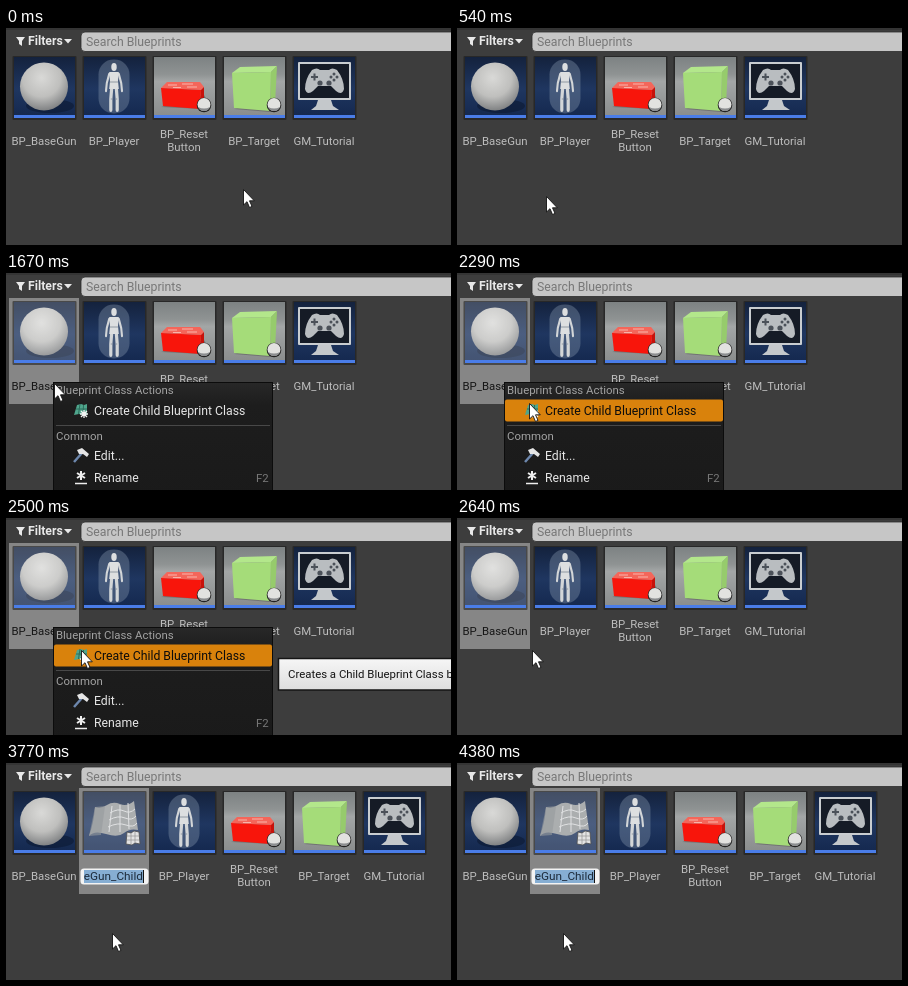
Write an HTML page that moves like this. It is 445 by 217 pixels and loops after 4.85 s.

```html
<!DOCTYPE html>
<html lang="en">
<head>
<meta charset="utf-8">
<title>Create child blueprint</title>
<style>
html, body { margin: 0; width: 100%; height: 100%; overflow: hidden; background: #3d3d3d; }
svg { display: block; width: 445px; height: 217px; font: 11.4px Roboto, Arial, sans-serif; }
text { white-space: pre; }
.m { font-size: 12.25px; }
.label { fill: #bdbdbd; text-anchor: middle; }
.picked .label { fill: #161616; }
.dim { fill: #a3a3a3; }
.lit { fill: #e6e6e6; }
</style>
</head>
<body>
<svg viewBox="0 0 445 217">
  <defs>
    <linearGradient id="navy" x2="0" y2="1">
      <stop stop-color="#14223d"/><stop offset=".55" stop-color="#1f3660"/><stop offset="1" stop-color="#152950"/>
    </linearGradient>
    <linearGradient id="scene" x2="0" y2="1">
      <stop stop-color="#7d8283"/><stop offset=".3" stop-color="#8f9393"/><stop offset=".42" stop-color="#a3a6a6"/><stop offset="1" stop-color="#8b8e8e"/>
    </linearGradient>
    <radialGradient id="ball" cx=".45" cy=".32" r=".72">
      <stop stop-color="#d9d9d7"/><stop offset=".55" stop-color="#bfbfbd"/><stop offset="1" stop-color="#787a7c"/>
    </radialGradient>
    <linearGradient id="tip" x2="0" y2="1">
      <stop stop-color="#f6f6f6"/><stop offset="1" stop-color="#dedede"/>
    </linearGradient>
    <linearGradient id="menuFill" x2="0" y2="1">
      <stop stop-color="#282828"/><stop offset=".2" stop-color="#1d1d1d"/><stop offset="1" stop-color="#1a1a1a"/>
    </linearGradient>

    <g id="gun">
      <rect width="61" height="58" fill="url(#navy)"/>
      <ellipse cx="36" cy="49" rx="24" ry="7" fill="#0d1a33" opacity=".6"/>
      <circle cx="30" cy="29.500" r="24" fill="url(#ball)"/>
    </g>
    <g id="child">
      <rect width="61" height="58" fill="url(#navy)"/>
      <path d="M11 15Q17 17 23 13T36 12T50 9L54 38Q46 36 40 41T22 42T5 44Q10 30 11 15Z" fill="#96999b"/>
      <path d="M26 21Q34 16 40 19T51 17M25 28Q34 23 41 26T52 24M24 35Q34 30 42 33T53 31M28 14L25 40M36 13L36 40M44 11L45 37" fill="none" stroke="#d8dadb"/>
      <path d="M11 15L5 44L17 43L21 14Z" fill="#7c8083" opacity=".6"/>
      <path d="M43 40L47 41L50 39L55 40L56 52L51 51L48 53L42 52Z" fill="#dcdcdc" stroke="#222" stroke-width=".8"/>
      <path d="M43 44H55M43 48H55M47 41V52M51 40V51" stroke="#777" stroke-width=".7"/>
    </g>
    <g id="player">
      <rect width="61" height="58" fill="url(#navy)"/>
      <rect x="14.500" y="2.500" width="31" height="54" rx="15" fill="#8192a8" opacity=".4"/>
      <g transform="translate(5.200) scale(.8 1)">
        <g fill="none" stroke="#d3d6d8" stroke-linecap="round">
          <path d="M25 17L22 26L21 34M37 17L40 26L41 34" stroke-width="2.600"/>
          <path d="M28 32L27 42L27 53M34 32L35 42L35 53" stroke-width="4"/>
        </g>
        <path d="M25 15H37L36 24L37 32H25L26 24Z" fill="#dddfe0"/>
        <path d="M26 25H36M27 42H29M33 42H35" stroke="#87909b"/>
        <ellipse cx="31" cy="10" rx="3.400" ry="4" fill="#dddfe0"/>
      </g>
    </g>
    <g id="badge">
      <circle cx="50" cy="48" r="7.300" fill="#222"/>
      <circle cx="50" cy="47.500" r="6.500" fill="#e2e2e0"/>
      <path d="M44 50A6.500 6.500 0 0 0 56 50Q50 53 44 50Z" fill="#8b8d8f"/>
    </g>
    <g id="reset">
      <rect width="61" height="58" fill="url(#scene)"/>
      <path d="M7 50L48 52L56 47L50 38Z" fill="#555" opacity=".5"/>
      <path d="M7 31L13 25L46 25L50 30L47 33Z" fill="#f4665a"/>
      <path d="M14 28H23M28 27H39M19 30.500H27M33 30H43" stroke="#f9b3aa" stroke-width="1.200"/>
      <path d="M7 31L47 33L46 52L9 49Z" fill="#f8150b"/>
      <path d="M47 33L50 30L50 48L46 52Z" fill="#c8120b"/>
      <use href="#badge"/>
    </g>
    <g id="target">
      <rect width="61" height="58" fill="url(#scene)"/>
      <path d="M10 52L46 55L57 49L51 40Z" fill="#555" opacity=".5"/>
      <path d="M8 16L16 10L53 9L47 15Z" fill="#b3e78b"/>
      <path d="M8 16L47 15L46 54L10 51Z" fill="#a5dc79"/>
      <path d="M47 15L53 9L51 47L46 54Z" fill="#96cb6c"/>
      <use href="#badge"/>
    </g>
    <g id="mode">
      <rect width="61" height="58" fill="url(#navy)"/>
      <path d="M24 43H37L39 49L45 53H17L22 49Z" fill="#c4c8cb"/>
      <rect x="4" y="5" width="53" height="38" rx="1" fill="#c9cdd0"/>
      <rect x="6" y="7" width="49" height="34" fill="#151b26"/>
      <path d="M18 13Q23 10 26 13H35Q38 10 43 13Q50 22 50 32Q48 39 42 34L37 29H24L19 34Q13 39 11 32Q11 22 18 13Z" fill="#b9bdc0"/>
      <path d="M17 20H24M20.500 16.500V23.500" stroke="#4b5159" stroke-width="2"/>
      <g fill="#4b5159"><circle cx="40" cy="17" r="1.500"/><circle cx="40" cy="23" r="1.500"/><circle cx="37" cy="20" r="1.500"/><circle cx="43" cy="20" r="1.500"/><circle cx="26" cy="26" r="2.600"/><circle cx="35" cy="26" r="2.600"/></g>
    </g>
    <g id="map">
      <path d="M71 132L75 131L78 132L81 131L81 142L77 142L73 141L68 142Z" fill="#4fa58c"/>
      <path d="M74 131L72.500 141M77.500 132L77 142M70 136H81" stroke="#2c6d5c" fill="none"/>
      <path d="M78 137V145M74 141H82M75 138L81 144M81 138L75 144" stroke="#f2f2f2" stroke-width="1.300"/>
    </g>
  </defs>

  <rect width="445" height="217" fill="#3d3d3d"/>
  <rect width="445" height="2" fill="#343434"/>
  <path d="M10 9H19L16 13V18L13 16V13Z" fill="#e8e8e8"/>
  <text x="22" y="17" class="m" font-weight="700" fill="#e8e8e8">Filters</text>
  <path d="M58 11H66L62 15.500Z" fill="#e8e8e8"/>
  <rect x="75" y="4" width="380" height="19.500" rx="4" fill="#c6c6c6" stroke="#2d2d2d" stroke-width=".8"/>
  <text x="80" y="18" class="m" fill="#777">Search Blueprints</text>

  <g id="tiles"></g>

  <g id="rename">
    <rect x="74.500" y="105.500" width="68" height="16" rx="3.500" fill="#f3f3f3"/>
    <rect x="78" y="107" width="59" height="13" fill="#86aed3"/>
    <text x="137" y="117" text-anchor="end" font-size="11.8" fill="#1c2b3b">eGun_Child</text>
    <rect id="caret" x="137" y="107" width="1" height="13" fill="#111"/>
  </g>

  <g id="info">
    <rect x="60.500" y="117.500" width="229" height="110" rx="2" fill="#626262" stroke="#1c1c1c"/>
    <rect x="66" y="123" width="218" height="32" rx="3" fill="#3b3b3b"/>
    <rect x="66" y="159" width="218" height="70" rx="3" fill="#3b3b3b"/>
    <text x="72" y="145" class="lit" font-size="16">BP_BaseGun</text>
    <text x="167" y="144" class="m lit">(Blueprint Class)</text>
  </g>

  <g id="menu">
    <rect x="47.500" y="109.500" width="219" height="115" fill="url(#menuFill)" stroke="#0c0c0c"/>
    <rect id="hot" x="48" y="126.500" width="218" height="22" rx="2" fill="#d9820c"/>
    <text x="50" y="121" class="dim">Blueprint Class Actions</text>
    <use href="#map"/>
    <text id="create" x="88" y="142" class="m">Create Child Blueprint Class</text>
    <path d="M50 152.500H264" stroke="#484848"/>
    <text x="50" y="167" class="dim">Common</text>
    <path d="M68 189L76 180" stroke="#6d87ad" stroke-width="2.500"/>
    <path d="M71 177L76 175L83 181L81 184L77 181L73 181Z" fill="#e5e5e5"/>
    <text x="88" y="187" class="m lit">Edit...</text>
    <path d="M75 198V207M71 200L79 205M79 200L71 205" stroke="#eee" stroke-width="2"/>
    <path d="M69 210.500H81" stroke="#eee" stroke-width="1.500"/>
    <text x="88" y="209" class="m lit">Rename</text>
    <text x="250" y="209" fill="#777">F2</text>
  </g>

  <g id="hint">
    <rect x="272.500" y="140.500" width="190" height="31.500" fill="url(#tip)" stroke="#151515" stroke-width="1.500"/>
    <text x="282" y="159.500" fill="#151515">Creates a Child Blueprint Class based on this</text>
  </g>

  <path id="arrow" d="M.5 .5V16L4 12.700L6.500 18.500L9 17.400L6.500 11.800H11.300Z" fill="#fff" stroke="#151515" stroke-width=".9"/>
  <path id="hand" d="M-3 8L-7 2Q-8 -.500 -6 -.500L-4 1.500L-5 -5Q-5 -7 -3 -6.500L-1.500 -1V-7.500Q0 -9.500 1.200 -7.500L1.500 -1L3 -6.500Q5 -7.500 5 -5.500L4.500 0L6 -3Q8 -3 7 -.500L5 4L4 8Z" fill="#fff" stroke="#151515" stroke-width=".9"/>
</svg>
<script>
const LOOP = 4850, PITCH = 70;
const $ = id => document.getElementById(id);
const show = (el, on) => el.setAttribute("display", on ? "inline" : "none");

const tiles = [
  ["gun", "BP_BaseGun"], ["child"], ["player", "BP_Player"],
  ["reset", "BP_Reset", "Button"], ["target", "BP_Target"], ["mode", "GM_Tutorial"]
].map(([art, ...lines]) => {
  const g = document.createElementNS("http://www.w3.org/2000/svg", "g");
  const top = lines.length > 1 ? 110 : 117;
  g.innerHTML = `<rect class="back" x="3" y="25" width="70" height="106"/>
    <rect x="6.500" y="28" width="64" height="64" rx="1" fill="#191919" opacity=".55"/>
    <use href="#${art}" x="8" y="29"/>
    <rect class="glow" x="8" y="29" width="61" height="58" fill="#fff"/>
    <rect x="8" y="87" width="61" height="3" fill="#4a7de8"/>` +
    lines.map((s, i) => `<text class="label" x="38" y="${top + i * 13}">${s}</text>`).join("");
  $("tiles").append(g);
  return g;
});

[["Path: ", "/Game/BlockBreaker/Blueprints"], ["Cooking Filepath Length: ", "151 / 260"],
 ["Blueprint Type: ", "Normal"], ["Num Replicated Properties: ", "0"]].forEach(([key, value], i) =>
  $("info").insertAdjacentHTML("beforeend",
    `<text class="m dim" x="72" y="${176.5 + i * 16}">${key}<tspan class="lit">${value}</tspan></text>`));

// Pointer hot spot: [time, x, y], held until the next entry.
const pointer = [
  [0, 237, 161], [180, 234, 166], [240, 222, 177], [300, 199, 188], [360, 168, 192],
  [420, 136, 188], [480, 110, 179], [540, 89, 168], [600, 74, 156], [660, 65, 146],
  [730, 55, 126], [780, 49, 114], [830, 46, 108], [1670, 48, 110],
  [2020, 51, 112], [2090, 58, 118], [2160, 66, 125], [2230, 72, 130], [2300, 75, 132],
  [3150, 76, 133], [3210, 82, 142], [3270, 93, 156], [3340, 102, 167], [3400, 105, 170],
  [3770, 106, 170]
];
const within = (t, a, b) => t >= a && t < b;
const fade = (t, ...steps) => steps.filter(s => t >= s).length / steps.length;

function render(t) {
  const added = t >= 2670, menuOpen = within(t, 1670, 2640), hot = t >= 2230;
  const selected = added ? 1 : t >= 1670 ? 0 : -1;
  const hovered = within(t, 730, 1670) ? 0 : -1;

  tiles.forEach((tile, i) => {
    const slot = !added && i > 1 ? i - 1 : i;
    tile.setAttribute("transform", `translate(${slot * PITCH})`);
    tile.setAttribute("class", i === selected ? "picked" : "");
    tile.querySelector(".back").setAttribute("fill",
      i === selected ? "#868686" : i === hovered ? "#4e4e4e" : "none");
    tile.querySelector(".glow").setAttribute("opacity", i === selected ? .2 : i === hovered ? .04 : 0);
    show(tile, i !== 1 || added);
  });

  show($("rename"), added);
  show($("caret"), within(t, 2670, 2910) || within(t, 3400, 3890) || t >= 4380);

  show($("info"), within(t, 880, 1670));
  $("info").setAttribute("opacity", fade(t, 880, 930, 990));
  show($("menu"), menuOpen);
  show($("hot"), hot);
  $("create").setAttribute("fill", hot ? "#0c0c0c" : "#e6e6e6");
  show($("hint"), within(t, 2370, 2640));
  $("hint").setAttribute("opacity", fade(t, 2370, 2430, 2500));

  const [, x, y] = pointer.findLast(p => p[0] <= t);
  const grab = within(t, 730, 1670) || within(t, 2670, 3210);
  for (const id of ["arrow", "hand"]) {
    $(id).setAttribute("transform", `translate(${x} ${y})`);
    show($(id), (id === "hand") === grab);
  }
}

let start;
function tick(now) {
  start ??= now;
  render((now - start) % LOOP);
  requestAnimationFrame(tick);
}
render(0);
requestAnimationFrame(tick);
</script>
</body>
</html>
```
